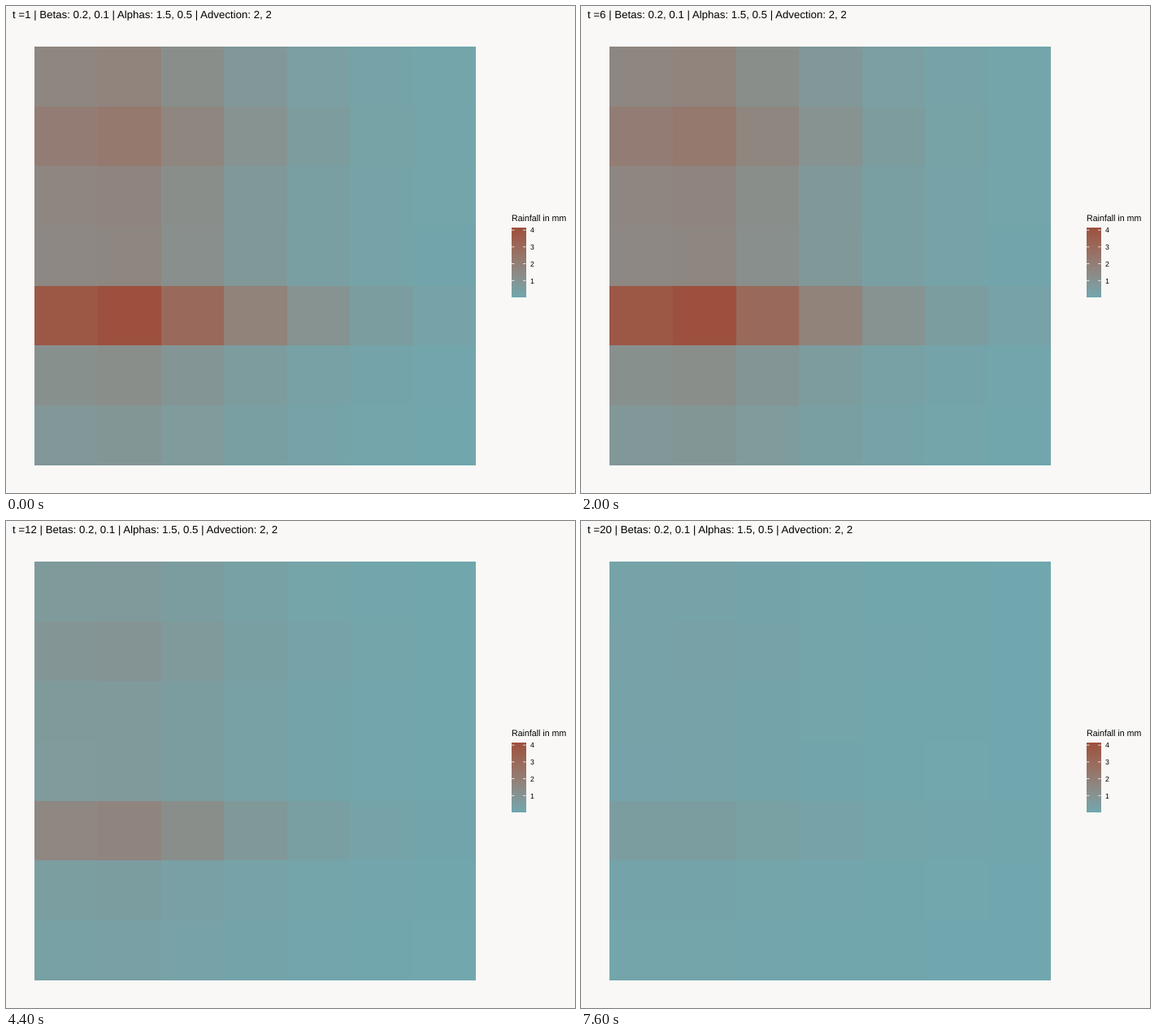
These frames come from a looping animation (700x600 px, 8 s). A matplotlib script:

```python
import matplotlib.pyplot as plt
import numpy as np
from matplotlib.animation import FuncAnimation
from matplotlib.colors import to_rgb

plt.rcParams.update({"font.family": "Liberation Sans", "text.hinting": "none"})

W, H, DPI = 700, 600, 100
PX = 72 / DPI
BACKGROUND, LOW, HIGH = "#F9F8F6", "#70A7AE", "#9D503D"
MAX_RAIN = 4.15
CELLS, FRAMES, FIRST_BURST = 7, 20, 5

TO_XYZ = np.array([[0.4124, 0.3576, 0.1805],
                   [0.2126, 0.7152, 0.0722],
                   [0.0193, 0.1192, 0.9505]])
# Opponent axes of the cube-rooted XYZ values
TO_LAB = np.array([[0, 116, 0], [500, -500, 0], [0, 200, -200]])
WHITE = TO_XYZ.sum(axis=1)


def rgb_to_lab(color):
    c = np.array(to_rgb(color))
    linear = np.where(c > 0.04045, ((c + 0.055) / 1.055) ** 2.4, c / 12.92)
    return TO_LAB @ np.cbrt(TO_XYZ @ linear / WHITE)


def lab_to_rgb(lab):
    xyz = (lab @ np.linalg.inv(TO_LAB).T) ** 3 * WHITE
    linear = np.clip(xyz @ np.linalg.inv(TO_XYZ).T, 0, 1)
    return np.where(linear > 0.0031308,
                    1.055 * linear ** (1 / 2.4) - 0.055, 12.92 * linear)


LAB_LOW, LAB_HIGH = rgb_to_lab(LOW), rgb_to_lab(HIGH)


def fill(share):
    """Colours for shares 0..1 of the maximum rainfall, blended in Lab."""
    share = np.asarray(share)[..., None]
    return np.clip(lab_to_rgb(LAB_LOW + share * (LAB_HIGH - LAB_LOW)), 0, 1)


def rain_field():
    """Rain falls off sideways from a crest; two rows stand out."""
    n = np.arange(CELLS)
    across = np.exp(-0.24 * np.abs(n - 0.65) ** 1.5)
    down = 0.42 - 0.001 * n ** 3
    down[1] += 0.13
    down[4] = 1
    field = np.outer(down, across)
    return field / field.max()


def strength(i):
    """Two bursts, the second one fading more slowly."""
    if i < FIRST_BURST:
        return np.exp(-0.26 * i)
    return np.exp(-0.15 * (i - FIRST_BURST))


def mesh(colors, x_edges, y_edges):
    return ax.pcolormesh(x_edges, y_edges, colors, antialiased=False)


def write(x, y, text, size):
    return ax.text(x, y, text, fontsize=size * PX, color="black",
                   va="baseline", ha="left")


fig = plt.figure(figsize=(W / DPI, H / DPI), dpi=DPI, facecolor=BACKGROUND)
ax = fig.add_axes([0, 0, 1, 1])
ax.axis("off")

FIELD = rain_field()
title = write(8, 15.3, "", 13.2)
tiles = mesh(fill(FIELD),
             np.round(np.linspace(35.45, 578.45, CELLS + 1)),
             np.round(np.linspace(49.9, 565.9, CELLS + 1)))

# Colour bar
LEFT, RIGHT, TOP, BOTTOM = 622, 639.5, 273, 359
mesh(fill(np.linspace(1, 0, BOTTOM - TOP))[:, None],
     [LEFT, RIGHT], np.arange(TOP, BOTTOM + 1))
write(621.5, 266, "Rainfall in mm", 10.65)
for value in range(1, 5):
    y = BOTTOM - value / MAX_RAIN * (BOTTOM - TOP)
    for start, end in ((LEFT, LEFT + 3.4), (RIGHT - 3.4, RIGHT)):
        ax.plot([start, end], [y, y], color="white", lw=0.8 * PX,
                solid_capstyle="butt", snap=False)
    write(644.4, y + 3.3, str(value), 8.8)

ax.set_xlim(0, W)
ax.set_ylim(H, 0)


def update(i):
    title.set_text(f"t ={i + 1} | Betas: 0.2, 0.1 | Alphas: 1.5, 0.5 | Advection: 2, 2")
    tiles.set_array(fill(FIELD * strength(i)))
    return title, tiles


anim = FuncAnimation(fig, update, frames=FRAMES, interval=400,
                     repeat=True, repeat_delay=0)
plt.show()
```
